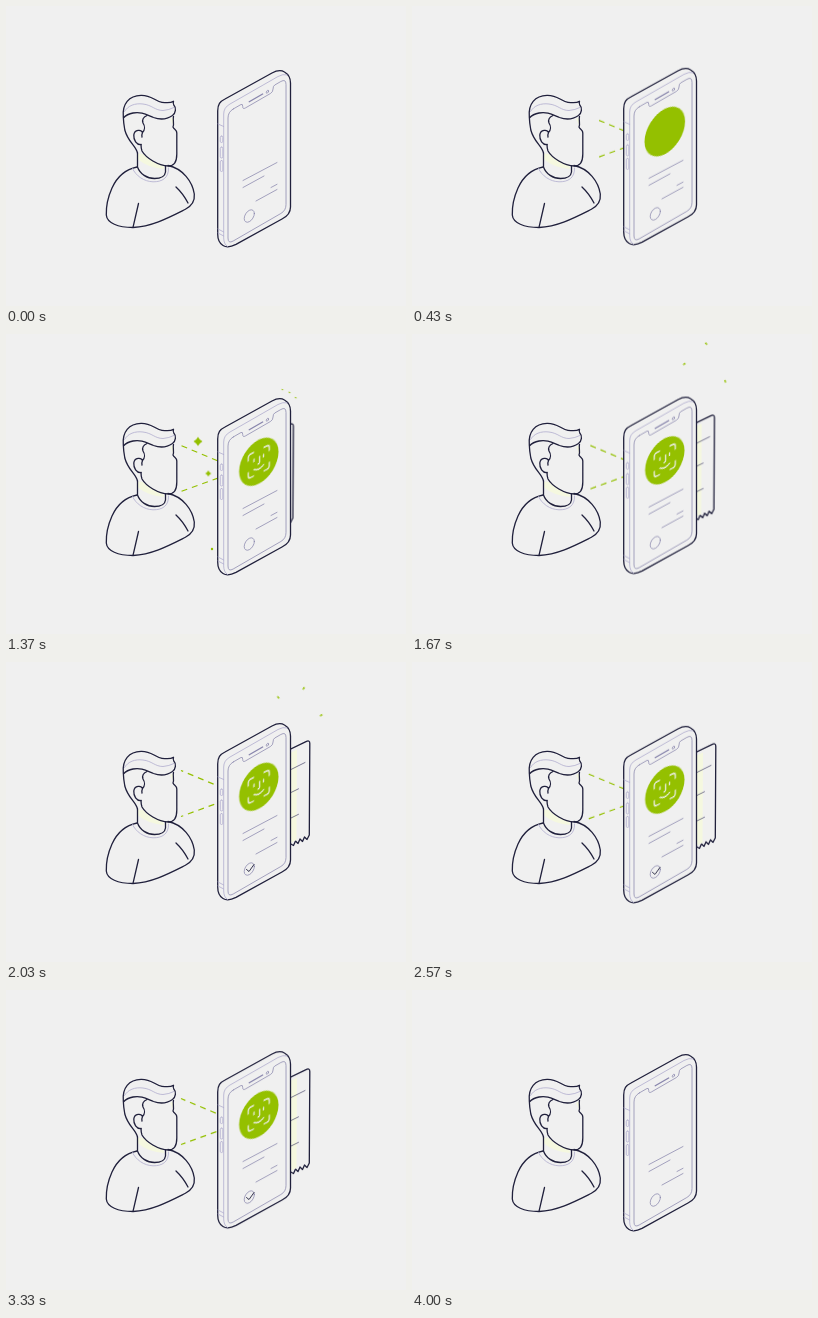
An HTML page for the animation above (4.03 s loop, 400 by 300 pixels).

```html
<!DOCTYPE html>
<html lang="en">
<head>
<meta charset="utf-8">
<title>Face payment</title>
<style>
  :root { --ink: #20203c; --soft: #b0adcf; --green: #94c000; --bg: #f0f0f0; --pale: #f5f8df; --loop: 4030ms; }
  html, body { margin: 0; width: 100%; height: 100%; overflow: hidden; background: var(--bg); }
  svg { display: block; width: 100vw; height: 100vh; }
  path, rect, circle { fill: none; stroke-linecap: round; stroke-linejoin: round; }
  .ink { stroke: var(--ink); stroke-width: 1.3; }
  .soft { stroke: var(--soft); stroke-width: .8; }
  .mid { stroke: #8986ad; stroke-width: .75; vector-effect: non-scaling-stroke; }
  .solid { fill: var(--bg); }
  .pale { fill: var(--pale); }
  .green { fill: var(--green); }

  .bob { animation: bob calc(var(--loop) / 3) ease-in-out infinite; }
  @keyframes bob { 50% { transform: translateY(-3px); } }

  .scan path { stroke: var(--green); stroke-width: 1.2; stroke-linecap: butt; stroke-dasharray: 6 5; animation: flow var(--loop) linear infinite; }
  @keyframes flow { from { stroke-dashoffset: 2.5px; } to { stroke-dashoffset: -38.9px; } }
  .reach { transform-origin: 212px 0; animation: reach var(--loop) ease-in-out infinite; }
  @keyframes reach {
    0%, 4% { transform: scaleX(0); }
    15.5%, 95.5% { transform: scaleX(1); }
    98.8%, 100% { transform: scaleX(0); }
  }

  .badge { animation: badge var(--loop) infinite; }
  @keyframes badge {
    0%, 3% { transform: scale(0); animation-timing-function: cubic-bezier(.3, 1.3, .6, 1); }
    15%, 90% { transform: scale(1); animation-timing-function: ease-in; }
    98.5%, 100% { transform: scale(0); }
  }
  .face path { stroke: var(--bg); stroke-width: 1.4; stroke-dasharray: 1 2; animation: face var(--loop) ease-out infinite; }
  @keyframes face {
    0%, 24% { stroke-dashoffset: 1px; opacity: 0; }
    24.5% { opacity: 1; }
    32.5%, 100% { stroke-dashoffset: 0px; opacity: 1; }
  }
  .check { stroke: var(--ink); stroke-width: .9; stroke-dasharray: 1 2; animation: check var(--loop) ease-out infinite; }
  @keyframes check {
    0%, 42% { stroke-dashoffset: 1px; opacity: 0; }
    42.5% { opacity: 1; }
    48.5%, 91% { stroke-dashoffset: 0px; opacity: 1; }
    96.5% { stroke-dashoffset: 1px; opacity: 1; }
    97%, 100% { stroke-dashoffset: 1px; opacity: 0; }
  }

  .receipt { animation: receipt var(--loop) infinite; }
  @keyframes receipt {
    0%, 31.5% { transform: translate(-22px, 10.5px); animation-timing-function: cubic-bezier(.4, .5, .4, 1); }
    46%, 85% { transform: none; animation-timing-function: ease-in-out; }
    94.5%, 100% { transform: translate(-22px, 10.5px); }
  }

  .twinkle { animation: twinkle var(--loop) ease-in-out infinite; }
  @keyframes twinkle {
    0%, 29% { transform: scale(0); }
    33%, 36% { transform: scale(1); }
    41%, 100% { transform: scale(0); }
  }

  .bit { animation: bit var(--loop) infinite; }
  @keyframes bit {
    0%, 30.5% { transform: translate(278px, 78px) scale(0); }
    34% { transform: translate(var(--a)) rotate(20deg) scale(.6); animation-timing-function: ease-out; }
    43.5% { transform: translate(var(--b)) rotate(calc(var(--r) - 90deg)) scale(.9); animation-timing-function: ease-in-out; }
    50%, 56% { transform: translate(var(--c)) rotate(var(--r)) scale(.9); animation-timing-function: ease-in; }
    61%, 100% { transform: translate(var(--c)) rotate(var(--r)) scale(0); }
  }
</style>
</head>
<body>
<svg viewBox="0 0 400 300" preserveAspectRatio="xMidYMid meet">
  <clipPath id="reach"><rect class="reach" x="173" y="100" width="39" height="70"/></clipPath>

  <!-- person -->
  <g>
    <path class="ink" d="M131 161C119 163.500 111 171 106 182C102 191 100 201 100.300 209C101 217 112 221.500 127 221.500C146 220.500 162 212 179 203.500C186 200 189 195 188.300 188C186.500 176 177 162.500 162 159.500"/>
    <path class="ink" d="M127 221.300L132.500 197.500M170 181Q177 187.500 182 197"/>
    <path class="pale" d="M131.500 147.500L137 148Q146 157 157 159.500L158.500 163Q142 162 131.500 153Z"/>
    <path class="soft" d="M126.500 162.500C130 170 138 175.500 147 175.800C156 176 163 172 162.500 162"/>
    <path class="ink" d="M131.500 147V161C134 168 141 172.500 148.500 172.500C155 172.500 159 170 159.500 166V160"/>
    <path class="pale" d="M164 113L167 111.500L167.500 121L166 117Z"/>
    <path class="ink" d="M167.500 110.500C166.500 114 168.500 118 167 121C168 123.500 170.800 123.500 170.800 127V148C170.800 155 169 160 162.500 160C152 159.500 140 152 136 145Q135 142 135 138.500"/>
    <path class="ink" d="M131.500 147C130 140 122 136 118.800 124Q117.500 117 117.300 111C116 98 123 89.500 135 89.300C146 89 148 95 156 96.300C161 97 165 97 167.500 95.300C167 97 167 98 167.800 99C170.500 102 169.800 107 166.500 109.500C160 114 153 113.500 147.500 111.500C140 108.500 135 105.500 127 107Q121 108 117.400 112"/>
    <path class="ink" d="M141 109.500C137.500 111 136 114 137 117C139 120 139 124 136.500 126.500C135.500 123.500 128.500 123 127.800 129C127.500 134 130.500 139 135 138.500M136.500 126.500Q135.500 129 136 131"/>
    <path class="soft" d="M118.500 105.500C122 99.500 129 97 137 98C146 99 149 104.500 157 104.500Q163 104 168 101.500"/>
  </g>

  <!-- flying bits -->
  <g>
    <rect class="bit green" x="-1.500" y="-.8" width="3" height="1.600" style="--a:283.500px,58.700px;--b:295px,6px;--c:297.700px,26.300px;--r:-55deg"/>
    <rect class="bit green" x="-1.500" y="-.8" width="3" height="1.600" style="--a:276.500px,55.700px;--b:272px,28px;--c:272.300px,35.400px;--r:50deg"/>
    <rect class="bit green" x="-1.500" y="-.8" width="3" height="1.600" style="--a:289.600px,63.800px;--b:315px,46px;--c:315.200px,53.300px;--r:-25deg"/>
  </g>

  <g class="bob">
    <g class="receipt">
      <path class="ink solid" d="M262 101L300.500 82.300Q303.800 81 303.800 84.500L303.300 176L301 180.500L298.500 178L296.500 182.500L294 180L292 184.500L289.500 182L287.500 186.500L284 184.500L281 189L262 197Z"/>
      <path class="pale" d="M284 94L291 90.500L290.500 181L284 184Z"/>
      <path class="mid" style="stroke:#555375" d="M284 111L299 103.500M284 134L292.500 129.800M284 159.500L292.500 155.300"/>
    </g>

    <g class="scan" clip-path="url(#reach)">
      <path d="M175 111.500L212 127"/>
      <path d="M175 157.500L212 144"/>
    </g>

    <!-- phone -->
    <path class="ink solid" d="M211.700 228V105C211.700 98 214 95.500 219 93L266 67C271 64.300 275 63.800 278.500 66C282.500 68.300 284.500 71 284.500 77V201C284.500 207 281 210.500 276 213L230 238.400C225 241 221 242 217 239.500C213 237 211.700 234 211.700 228Z"/>
    <path class="soft" d="M221.500 240.500Q217.700 238 217.700 232V108Q217.700 101.500 224 98L272 70.500Q277 67.700 281 68.800"/>
    <path class="soft" d="M212 118L217.700 120.500M212 223L217.700 226M212 227L217.700 230"/>
    <g class="soft">
      <rect x="214.300" y="130" width="2.500" height="6.500" rx="1.250"/>
      <rect x="214.300" y="141" width="2.500" height="11" rx="1.250"/>
      <rect x="214.300" y="154.500" width="2.500" height="11" rx="1.250"/>
    </g>
    <g transform="matrix(.866 -.5 0 1 222 106)">
      <path class="mid" d="M6 0H15Q17 0 17 3Q17 6 20 6H49Q52 6 52 3Q52 0 54 0H61Q67 0 67 6V126Q67 132 61 132H6Q0 132 0 126V6Q0 0 6 0Z"/>
      <path class="mid" style="stroke-width:1.400" d="M24.500 2H40"/>
      <circle class="mid" cx="45.500" cy="2.500" r="1.300"/>
    </g>
    <path class="mid" d="M237 174.500L271 156.500M237 181.500L258 170M250 195L271 183.500M265 181.500L271 178.300"/>
    <circle class="mid" r="5.800" transform="matrix(.875 -.44 0 .98 243.300 210)"/>
    <path class="check" pathLength="1" d="M240.500 210.500L243 212.500L248 205.500"/>

    <g transform="matrix(.875 -.44 0 .98 252.800 127.700)">
      <g class="badge">
        <circle class="green" r="22.500"/>
        <g class="face">
          <path pathLength="1" d="M-12 -6V-9Q-12 -12 -9 -12H-6"/>
          <path pathLength="1" d="M6 -12H9Q12 -12 12 -9V-6"/>
          <path pathLength="1" d="M12 6V9Q12 12 9 12H6"/>
          <path pathLength="1" d="M-6 12H-9Q-12 12 -12 9V6"/>
          <path pathLength="1" d="M-5.500 -5V-2.500"/>
          <path pathLength="1" d="M5.500 -5V-2.500"/>
          <path pathLength="1" d="M.8 -5V1Q.8 2 -1 2"/>
          <path pathLength="1" d="M-5.500 5.500Q0 9.500 5.500 5.500"/>
        </g>
      </g>
    </g>
  </g>

  <!-- sparkles -->
  <g transform="translate(192 107.400)"><path class="twinkle green" d="M0 -4.500Q1.500 -1.500 4.500 0Q1.500 1.500 0 4.500Q-1.500 1.500 -4.500 0Q-1.500 -1.500 0 -4.500Z"/></g>
  <g transform="translate(202.300 139.500)"><path class="twinkle green" d="M0 -3Q1.100 -1.100 3 0Q1.100 1.100 0 3Q-1.100 1.100 -3 0Q-1.100 -1.100 0 -3Z"/></g>
  <g transform="translate(206 215)"><circle class="twinkle green" r="1.200"/></g>
</svg>
</body>
</html>
```
